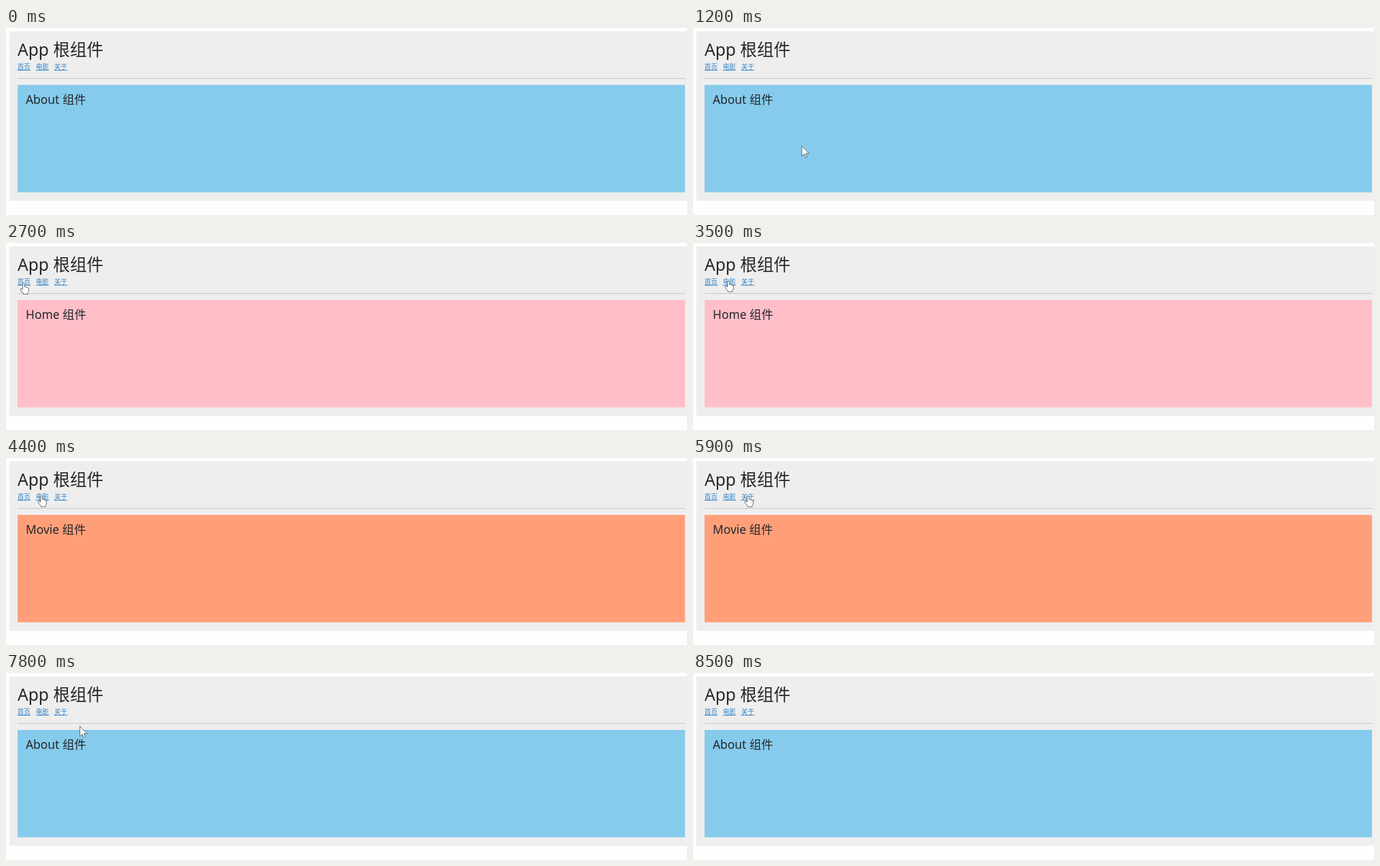
Write an HTML page that moves like this. It is 1000 by 276 pixels and loops after 9700 ms.

```html
<!DOCTYPE html>
<html lang="zh-CN">
<head>
<meta charset="utf-8">
<title>App 根组件</title>
<style>
  html, body { margin: 0; width: 100%; height: 100%; overflow: hidden; background: #fefefe; }
  svg { display: block; width: 100%; height: 100%; }
  text { font-family: "Noto Sans", "Noto Sans CJK SC", "Noto Sans CJK", sans-serif; fill: #23272b; }
  .links text { font-size: 9.7px; fill: #2f80c6; text-decoration: underline; }
  .cursor path { fill: #fff; stroke: #555b60; stroke-width: .9; stroke-linejoin: round; }
</style>
</head>
<body>
<svg viewBox="0 0 1000 276">
  <rect x="5" y="5" width="995" height="250" fill="#eee"/>
  <text x="17" y="41" font-size="24.6">App 根组件</text>
  <g class="links">
    <text x="16.7" y="60.8">首页</text>
    <text x="43.7" y="60.8">电影</text>
    <text x="70.7" y="60.8">关于</text>
  </g>
  <rect x="17" y="74" width="980" height="1" fill="#c5c6c6"/>
  <rect id="view" x="17" y="84" width="980" height="158.5"/>
  <text id="title" x="29" y="112" font-size="17.4"></text>
  <g id="cursor" class="cursor">
    <path id="hand" d="M-1.5 9V1Q-1.5-.2-.2-.2T1.2 1V5.2Q3.2 4.6 3.6 5.9Q5.3 5.3 5.7 6.7Q7.4 6.3 7.4 8.2V11Q7.4 13 5.9 14.4V16H-.8V14.6L-4.8 9.6Q-5.3 8.2-4 7.8Q-3 7.6-1.5 9Z"/>
    <path id="arrow" d="M0 0V15L3.5 11.7 5.8 17 8.1 16 5.8 10.9H10.6Z"/>
  </g>
</svg>
<script>
const LOOP = 9700, STEP = 100;
const $ = id => document.getElementById(id);

const views = [
  { at: 0, name: "About", color: "#86cbec" },
  { at: 2700, name: "Home", color: "#ffbec8" },
  { at: 4400, name: "Movie", color: "#ff9f7a" },
  { at: 6500, name: "About", color: "#86cbec" }
];

// Pointer moves: start, end, and the three points of a quadratic curve.
const home = [26, 59.5], movie = [52, 56], about = [81, 56];
const moves = [
  { start: 800, end: 2100, curve: [[184, 240], [138, 78], home] },
  { start: 3000, end: 3500, curve: [home, [39, 60], movie] },
  { start: 5200, end: 5900, curve: [movie, [66, 58], about] },
  { start: 7500, end: 8500, curve: [about, [110, 92], [460, 280]] }
];

const latest = (list, key, t) => list.filter(item => item[key] <= t).pop();
const smooth = u => u * u * (3 - 2 * u);

function pointOn([a, b, c], u) {
  const v = 1 - u;
  return a.map((_, i) => v * v * a[i] + 2 * u * v * b[i] + u * u * c[i]);
}

function overLink(x, y) {
  return y > 51 && y < 64 && [17, 44, 71].some(left => x >= left && x <= left + 19.5);
}

function draw(now) {
  const t = Math.floor(now % LOOP / STEP) * STEP;
  const view = latest(views, "at", t);
  $("view").setAttribute("fill", view.color);
  $("title").textContent = view.name + " 组件";

  const move = latest(moves, "start", t);
  const visible = move && t < 8500;
  $("cursor").style.display = visible ? "" : "none";
  if (visible) {
    const u = Math.min(1, (t - move.start) / (move.end - move.start));
    const [x, y] = pointOn(move.curve, smooth(u));
    const onLink = overLink(x, y);
    $("cursor").setAttribute("transform", `translate(${x} ${y})`);
    $("hand").style.display = onLink ? "" : "none";
    $("arrow").style.display = onLink ? "none" : "";
  }
}

const began = performance.now();
function tick() {
  draw(performance.now() - began);
  requestAnimationFrame(tick);
}
tick();
</script>
</body>
</html>
```
